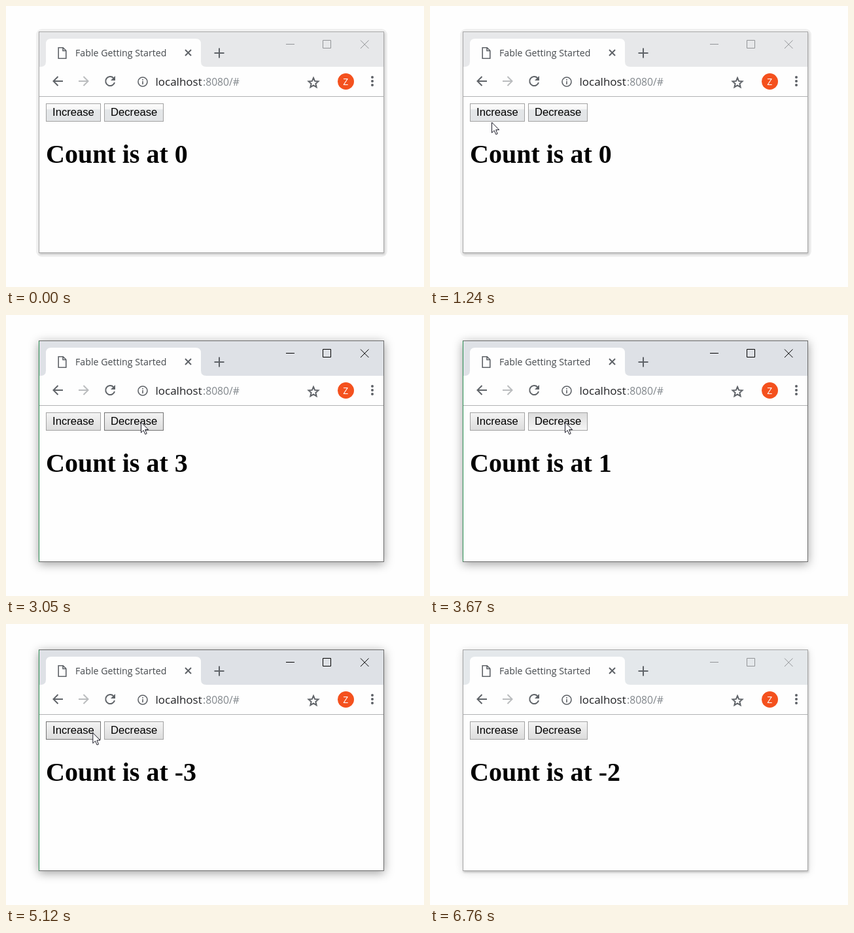
An HTML page that plays this animation: 639x430 px, repeating every 6850 ms.

```html
<!DOCTYPE html>
<html lang="en">
<head>
<meta charset="utf-8">
<title>Counter demo</title>
<style>
html, body { margin: 0; width: 639px; height: 430px; overflow: hidden; background: #fefefe; }
div, svg { position: absolute; left: 0; top: 0; }
#halo { left: 46px; top: 35px; width: 537px; height: 349px; border-radius: 9px; background: #f0f0f0; }
#win { left: 50px; top: 39px; width: 526px; height: 337px; background: #fefefe; border: 1px solid; }
.ui { font-family: "Open Sans", "Noto Sans", sans-serif; }
.button { font: 16.67px "Liberation Sans", Arial, sans-serif; }
#count { font: bold 40px "Liberation Serif", "Times New Roman", serif; }
.line { fill: none; stroke: #5f6368; stroke-width: 2; }
.thin { stroke-width: 1.6; }
</style>
</head>
<body>
<div id="halo"></div>
<div id="win"></div>
<svg width="639" height="430">
  <defs>
    <linearGradient id="fresh" x2="0" y2="1">
      <stop stop-color="#fcfcfc"/><stop offset=".3" stop-color="#f6f6f6"/>
      <stop offset=".34" stop-color="#e4e7e9"/><stop offset="1" stop-color="#e2e4e6"/>
    </linearGradient>
    <linearGradient id="plain" x2="0" y2="1">
      <stop stop-color="#f4f4f4"/><stop offset="1" stop-color="#dcdcdc"/>
    </linearGradient>
    <linearGradient id="pressed" x2="0" y2="1">
      <stop stop-color="#dcdcdc"/><stop offset="1" stop-color="#f6f6f6"/>
    </linearGradient>
  </defs>

  <rect id="titlebar" x="51" y="40" width="526" height="53"/>
  <path fill="#fefefe" d="M53 93q8 0 8-8V58q0-8 8-8H290q8 0 8 8V85q0 8 8 8z"/>
  <path class="line thin" d="M80.200 63.700H87.200L91.800 68.300V80.300H80.200zM87 63.700V68.500H91.800"/>
  <text class="ui" x="106" y="77" font-size="14.200" fill="#45494d">Fable Getting Started</text>
  <path class="line" d="M274 67l9 9m0-9l-9 9"/>
  <path class="line" d="M318.500 72h15m-7.500-7.500v15"/>
  <path id="controls" fill="none" d="M428 58.500h13M484.500 52.500h12v12h-12zM542 52.500l12.500 12.500m0-12.500L542 65"/>

  <path class="line" d="M87 115H72.500m7-7l-7 7 7 7"/>
  <path class="line" style="stroke:#babcbe" d="M111 115h14.500m-7-7l7 7-7 7"/>
  <path class="line" d="M164.300 110.200A7 7 0 1 0 166 117"/>
  <path fill="#5f6368" d="M167 107v7h-7z"/>
  <circle class="line thin" cx="209" cy="116" r="7"/>
  <path class="line thin" d="M209 115v5m0-8v1.800"/>
  <text class="ui" y="122" fill="#80868b"><tspan x="228.500" font-size="17" fill="#202124">localhost</tspan><tspan x="301" font-size="15.700">:8080/#</tspan></text>
  <path class="line" d="M470 110l2.100 4.900 5.300.5-4 3.500 1.200 5.200-4.600-2.800-4.600 2.800 1.200-5.200-4-3.500 5.300-.5z"/>
  <circle cx="519.500" cy="115.500" r="12.500" fill="#f4511e"/>
  <text class="ui" x="519.300" y="120.500" font-size="14" fill="#fff" text-anchor="middle">Z</text>
  <g fill="#5f6368"><circle cx="560" cy="109" r="2"/><circle cx="560" cy="115" r="2"/><circle cx="560" cy="121" r="2"/></g>
  <path stroke="#b0b1b3" d="M51 138.500H577"/>

  <g class="button">
    <rect id="increase" x="61.500" y="149.500" width="83" height="27"/>
    <rect id="decrease" x="150.500" y="149.500" width="90" height="27"/>
    <text x="71" y="168">Increase</text>
    <text x="160" y="168">Decrease</text>
  </g>
  <text id="count" x="61" y="240"></text>
  <path id="cursor" fill="#fff" stroke="#1c1c28" d="M0 0V16L3.700 12.500 6.300 18.500 8.700 17.500 6.200 11.500H11.200z"/>
</svg>
<script>
const LOOP = 6850;
const $ = id => document.getElementById(id);

// Cursor path: time, x, y
const path = [
  [90, 541, 416], [760, 241, 290], [1240, 94.5, 178], [1380, 94.5, 178], [1440, 96.5, 169],
  [2170, 96.5, 169], [2630, 203.5, 168], [2900, 203.5, 168], [3020, 206.5, 164],
  [4920, 206.5, 164], [5160, 118.5, 167], [5400, 118.5, 167], [5580, 159, 180],
  [5790, 304.5, 256], [6290, 573, 411], [6350, 580, 416]
];

// Clicks: button, press time, count time, release time, step
const clicks = [
  ["increase", 1470, 1530, 1560, 1], ["increase", 1720, 1800, 1830, 1], ["increase", 1930, 2090, 2170, 1],
  ["decrease", 3100, 3160, 3190, -1], ["increase", 5220, 5300, 5330, 1]
];
for (let i = 0; i < 5; i++) {
  const down = 3460 + 150 * i;
  clicks.push(["decrease", down, down + 80, down + 80, -1]);
}

// Title bar, border, left border, window controls, shadow
const looks = {
  idle: ["#e7e8ea", "#a8a8a8", "#a8a8a8", "#929497", "1px 2px 3px rgba(0,0,0,.2)"],
  active: ["#dee1e6", "#6c6c6c", "#2d9156", "#000", "0 3px 14px rgba(0,0,0,.38)"],
  left: ["#e4e8eb", "#a6a6a6", "#a6a6a6", "#929497", "1px 2px 3px rgba(0,0,0,.2), 0 2px 12px rgba(0,0,0,.14)"]
};

function cursorAt(t) {
  const i = path.findIndex(p => p[0] > t);
  if (i < 1) return null;
  const [t0, x0, y0] = path[i - 1], [t1, x1, y1] = path[i];
  const k = (t - t0) / (t1 - t0);
  return [x0 + (x1 - x0) * k, y0 + (y1 - y0) * k];
}

function drawWindow(t) {
  const look = looks[t < 1470 ? "idle" : t < 6660 ? "active" : "left"];
  const [bar, border, leftBorder, controls, shadow] = look;
  $("titlebar").setAttribute("fill", bar);
  $("controls").setAttribute("stroke", controls);
  $("halo").hidden = t >= 1470;
  const style = $("win").style;
  style.borderColor = border;
  style.borderLeftColor = leftBorder;
  style.boxShadow = t >= 6660 && t < 6760 ? looks.active[4] : shadow;
}

function drawButton(id, t, cursor, usedFrom) {
  const box = $(id), left = box.x.baseVal.value, width = box.width.baseVal.value;
  const hover = cursor && cursor[0] > left && cursor[0] < left + width && cursor[1] > 149 && cursor[1] < 177;
  const pressed = clicks.some(([name, down, , up]) => name === id && t >= down && t < up);
  box.setAttribute("fill", `url(#${pressed ? "pressed" : t < usedFrom ? "fresh" : "plain"})`);
  box.setAttribute("stroke", hover && !pressed ? "#747474" : "#a2a2a2");
}

function draw(t) {
  const cursor = cursorAt(t);
  drawWindow(t);
  drawButton("increase", t, cursor, 1470);
  drawButton("decrease", t, cursor, 2400);
  const count = clicks.reduce((sum, [, , at, , step]) => sum + (t >= at ? step : 0), 0);
  $("count").textContent = `Count is at ${count}`;
  $("cursor").style.display = cursor ? "" : "none";
  if (cursor) $("cursor").setAttribute("transform", `translate(${cursor})`);
}

const start = performance.now();
function tick() {
  draw((performance.now() - start) % LOOP);
  requestAnimationFrame(tick);
}
tick();
</script>
</body>
</html>
```
